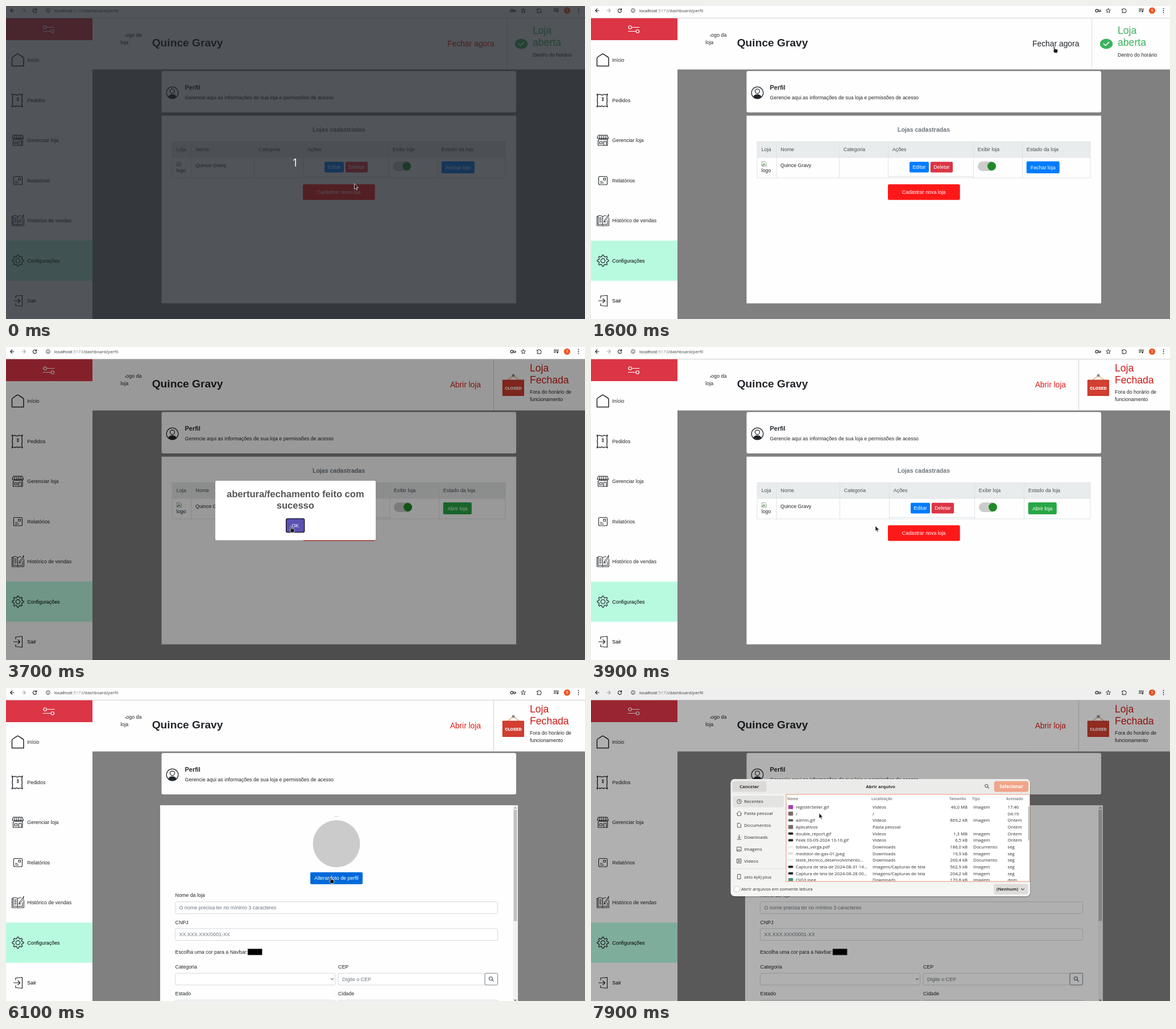
An HTML page for the animation above (8000 ms loop, 1018 by 550 pixels).

```html
<!DOCTYPE html>
<html lang="pt-BR">
<head>
<meta charset="utf-8">
<title>Painel da loja</title>
<style>
html, body { margin: 0; width: 100%; height: 100%; overflow: hidden; background: #808080; }
svg { display: block; width: 1018px; height: 550px; }
text { font-family: "Liberation Sans", Arial, sans-serif; white-space: pre; }
.ui { font-family: "Open Sans", "Noto Sans", sans-serif; }
</style>
</head>
<body>
<svg id="stage" viewBox="0 0 1018 550" xmlns="http://www.w3.org/2000/svg"></svg>
<script>
const LOOP = 8000, STEP = 100;
const INK = '#212529', WHITE = '#fefefe', BLUE = '#007bff', RED = '#dc3545', GREEN = '#28a745', LINE = '#dee2e6', MUTED = '#6c757d';

const rect = (x, y, w, h, fill, r = 0, extra = '') =>
  `<rect x="${x}" y="${y}" width="${w}" height="${h}" rx="${r}" fill="${fill}" ${extra}/>`;
const circle = (x, y, r, fill, extra = '') => `<circle cx="${x}" cy="${y}" r="${r}" fill="${fill}" ${extra}/>`;
const path = (d, color = INK, w = 1.1, fill = 'none') =>
  `<path d="${d}" stroke="${color}" stroke-width="${w}" fill="${fill}" stroke-linecap="round" stroke-linejoin="round"/>`;
const text = (x, y, s, size = 8.9, fill = INK, extra = '') =>
  `<text x="${x}" y="${y}" font-size="${size}" fill="${fill}" ${extra}>${s}</text>`;
const mid = 'text-anchor="middle"', end = 'text-anchor="end"', bold = 'font-weight="700"', ui = 'class="ui"';
const group = (id, body, extra = '') => `<g id="${id}" ${extra}>${body}</g>`;
const button = (x, y, w, h, fill, label, base) =>
  rect(x, y, w, h, fill, 2) + text(x + w / 2, base, label, 8.9, '#fff', mid);

function toolbar() {
  return rect(0, 0, 1018, 21, WHITE) + rect(0, 20.8, 1018, .8, '#d5d5d5') +
    path('M14 8H8M10.8 5L7.8 8L10.8 11') + path('M28 8H34M31.2 5L34.2 8L31.2 11', '#aaa') +
    path('M53.3 6.4A3.2 3.2 0 1 0 53.7 9M53.8 4.6V6.9H51.5') +
    circle(74, 8, 3.3, 'none', 'stroke="#444"') + path('M74 7.8V9.8M74 6.2V6.3', '#444', .9) +
    text(85, 11, 'localhost<tspan fill="#80868b">:5173</tspan><tspan fill="#3c4043">/dashboard/perfil</tspan>', 7.5, INK, ui) +
    circle(889.3, 8.2, 2.3, 'none', `stroke="${INK}" stroke-width="1.2"`) + path('M891.7 7.2H896.2V9.4H891.7M894.5 9.4V10.5', INK, 1) +
    path('M909.5 4.2L910.6 6.8L913.4 7L911.3 8.9L912 11.7L909.5 10.2L907 11.7L907.7 8.9L905.6 7L908.4 6.8Z', INK, .9) +
    path('M934 5.5H936A1.2 1.2 0 0 1 938.4 5.5H940.2V7.2A1.2 1.2 0 0 1 940.2 9.8V11.7H934V9.8A1.2 1.2 0 0 0 934 7.2Z', INK, 1) +
    path('M963.5 5H969M963.5 7.2H969M963.5 9.4H966.5M970.5 9.5V5H971.5', INK, 1) + circle(969.5, 9.7, 1.3, INK) +
    circle(986.5, 8, 5.6, '#f0501e') + text(986.5, 10.3, 'S', 6.3, '#fff', mid) +
    [4.5, 8, 11.5].map(y => circle(1006.5, y, .9, INK)).join('');
}

function gear(cx, cy) {
  const pts = [];
  for (let i = 0; i < 32; i++) {
    const a = (i - .5) * Math.PI / 16, r = i % 4 < 2 ? 10 : 7.3;
    pts.push((cx + r * Math.sin(a)).toFixed(1) + ' ' + (cy - r * Math.cos(a)).toFixed(1));
  }
  return path('M' + pts.join('L') + 'Z', INK, 1.2) + circle(cx, cy, 3.7, 'none', `stroke="${INK}" stroke-width="1.2"`);
}

function sidebar() {
  const labels = ['Início', 'Pedidos', 'Gerenciar loja', 'Relatórios', 'Histórico de vendas', 'Configurações', 'Sair'];
  return rect(0, 21.5, 152, 528.5, WHITE) + rect(0, 21.5, 152, 38.5, RED) + rect(0, 412.3, 152, 70.5, '#b8fae0') +
    path('M65.5 37.5H66M71.5 37.5H85M65.5 44.5H79M84.5 44.5H85', '#fff', 1.2) +
    circle(68.7, 37.5, 2.7, 'none', 'stroke="#fff" stroke-width="1.1"') + circle(81.8, 44.5, 2.7, 'none', 'stroke="#fff" stroke-width="1.1"') +
    labels.map((s, i) => text(37.3, 98 + i * 70.5, s, 8.9, i > 4 ? '#000' : INK)).join('') +
    path('M10.5 92.5Q10.5 90.5 12 89.5L19 84.8Q20.7 83.8 22.3 84.8L29.5 89.5Q31 90.5 31 92.5V105.5H10.5Z', INK, 1.5) +
    path('M10.5 154.5Q13 157 15.5 155Q19.5 158 23.5 155Q26 157 29 154.5Q27 160 28.5 166Q27 172 29 177.5Q25 174.5 22 177Q19 174 16 177Q13.5 174.5 10.5 177.5Q12.5 172 11 166Q12.5 160 10.5 154.5Z', INK, 1.3) +
    path('M19.5 161.5H22M20 163.7H22M19.5 166H22', INK, 1.3) +
    path('M13 227H28.5L30.5 232.5H11ZM12.5 235V245H29V235M12.5 235Q14 236 15.5 233Q17.5 237 19 233Q20.8 237 22.5 233Q24.3 237 26 233Q28 237 30 233M15.7 227L15 233M19 227V233M22.5 227V233M26 227L26.5 233M15 238.5H20V242H15ZM22.5 245V238H27V245', INK, 1.1) +
    rect(13.5, 299.5, 15, 14.5, 'none', 2, `stroke="${INK}" stroke-width="1.1"`) + rect(22, 302.5, 3.5, 3.5, 'none', 0, `stroke="${INK}"`) +
    path('M16.5 308.3H20M16.5 311H22', INK, 1) +
    path('M10.5 370H12.5V368.5Q17 367 20.5 370Q23 368 26 368.5M31.5 373V386H22.5Q21 387.5 19.5 386H10.5V370M20.5 370V384.5Q16 382 12.5 384V370M20.5 384.5Q25 382 29 384V377M14.5 372H18.5M14.5 374.5H18.5M14.5 377H18.5M14.5 379.5H18.5M22.5 379.5H26M31 366.5L24 376L23 378.5L25.5 377Q31.5 372 31 366.5Z', INK, 1) +
    gear(21, 447.5) +
    path('M17 513V509.5L28.5 508.5V527.5L17 526.5V523M13.5 518H24.5M21 514.5L24.6 518L21 521.5', INK, 1.2);
}

function page() {
  return rect(152, 21.5, 866, 90, WHITE) +
    text(209.3, 54, 'logo da') + rect(207, 45, 4.6, 6, WHITE) + text(201.3, 67, 'loja') +
    text(256.7, 71, 'Quince Gravy', 19.2, INK, bold) +
    rect(273.5, 114.3, 623.5, 72.7, WHITE, 3) +
    circle(292.5, 152.5, 10.3, 'none', `stroke="${INK}" stroke-width="1.2"`) + circle(292.5, 149.8, 4, 'none', `stroke="${INK}" stroke-width="1.2"`) +
    path('M285.5 159.5Q287 155.5 292.5 155.5Q298 155.5 299.5 159.5Q293 165 285.5 159.5Z', INK, .6, INK) +
    text(314.6, 147, 'Perfil', 10.9, INK, bold) +
    text(314.6, 163.5, 'Gerencie aqui as informações de sua loja e permissões de acesso') +
    rect(273.5, 192.7, 623.5, 329.8, WHITE) +
    text(585, 221.3, 'Lojas cadastradas', 10.55, MUTED, bold + ' ' + mid) +
    rect(292.5, 238.5, 585.5, 27.5, '#e9ecec');
}

function table(cols, label, color, width) {
  const heads = ['Loja', 'Nome', 'Categoria', 'Ações', 'Exibir loja', 'Estado da loja'];
  const [, , actions, toggle, state] = cols;
  return heads.map((s, i) => text((i ? cols[i - 1] : 292.5) + 7.3, 255, s, 8.9, '#495057')).join('') +
    path('M' + cols.map(x => `${x} 238.5V302`).join('M'), LINE, 1) +
    path(`M292.5 238.5H878V302H292.5ZM292.5 266H878M${actions + 1} 299.5H${toggle}`, LINE, 1) +
    path('M300.5 273.5H306L308.5 276V281.5H300.5Z', '#999', .8, '#eef3ee') + path('M301.5 280.5L304 277.5L306 279', '#4a9a4a', 1.2) +
    text(299.7, 291.6, 'logo') + text(333, 282.7, 'Quince Gravy') +
    button(actions + 37.5, 273.8, 34, 18.7, BLUE, 'Editar', 286) +
    button(actions + 74.3, 273.8, 39.3, 18.7, RED, 'Deletar', 286) +
    rect(toggle + 7.5, 273.2, 32, 16.8, '#ccc', 8.4) + circle(toggle + 32, 281.5, 7.5, '#1f8a26') +
    button(state + 7.2, 273, width, 21, color, label, 286.5);
}

const openState = () =>
  path('M880.5 22V111', '#dcdcdc', 1) +
  `<text id="closeNow" x="776" y="71" font-size="13.85">Fechar agora</text>` +
  `<ellipse cx="906" cy="66.5" rx="11.2" ry="9" fill="#3bb35f"/>` + path('M901.5 66.5L904.7 69.5L910.5 63.7', '#fff', 1.7) +
  text(926, 49.2, 'Loja', 17.65, '#3bb35f') + text(926, 70.2, 'aberta', 17.65, '#3bb35f') + text(926, 88.5, 'Dentro do horário') +
  table([326, 436.5, 522.5, 672.5, 758.5], 'Fechar loja', BLUE, 58);

const closedState = () =>
  path('M857.5 22V111', '#d2d2d2', 1) + text(780.7, 71, 'Abrir loja', 13.75, '#dd1c1a') +
  path('M882 58L892 50L902 58', '#e2a869', 1.4) + circle(892, 50, 2.6, '#8a8f8c') +
  rect(872.7, 57.5, 38.3, 28.5, '#d23f31', 1) + rect(874.5, 59.3, 34.7, 24.9, 'none', 0, 'stroke="#b93a2e" stroke-width=".8"') +
  text(892, 75, 'CLOSED', 8, '#fff', mid + ' style="font-family:Roboto,sans-serif;font-weight:900"') +
  text(921, 42.5, 'Loja', 17.65, '#cf1b17') + text(921, 63.6, 'Fechada', 17.65, '#cf1b17') +
  text(921, 82, 'Fora do horário de') + text(921, 95.3, 'funcionamento') +
  table([326, 437.5, 524.5, 674.5, 761.5], 'Abrir loja', GREEN, 50);

function form() {
  const field = (x, y, w, hint = '') =>
    rect(x, y, w, 20.7, '#fff', 2, 'stroke="#ced4da" stroke-width=".9"') + text(x + 7, y + 13.5, hint, 8.9, MUTED);
  return rect(271, 192, 629, 358, '#808080') + rect(271, 206, 629, 344, WHITE) +
    rect(891.5, 206, 8, 344, '#f1f1f1') + rect(892.5, 214, 6, 195.5, '#c1c1c1') +
    path('M893.8 211.3L895.5 209.3L897.2 211.3Z', '#777', .3, '#777') + path('M893.8 548L895.5 550L897.2 548Z', '#555', .3, '#555') +
    group('photo', rect(577, 225, 8, .8, '#ccc') + circle(581, 273.7, 41.4, '#cbcbcb')) +
    `<rect id="photoButton" x="535" y="323.7" width="92" height="21" rx="2"/>` + text(581, 337.3, 'Alterar foto de perfil', 8.9, '#fff', mid) +
    text(297.5, 367.3, 'Nome da loja') + field(297.5, 375.7, 567, 'O nome precisa ter no mínimo 3 caracteres') +
    text(297.5, 414.6, 'CNPJ') + field(297.5, 422.8, 567, 'XX.XXX.XXX/0001-XX') +
    text(297.5, 466.5, 'Escolha uma cor para a Navbar:') + rect(425, 458.2, 25.3, 11, '#000', 0, 'stroke="#999" stroke-width=".7"') +
    text(297.5, 493, 'Categoria') + field(297.5, 501.2, 281) + path('M571.5 510.5L573.5 512.7L575.5 510.5', INK, 1) +
    text(584, 493, 'CEP') + field(584, 501.2, 258, 'Digite o CEP') +
    rect(842, 501.2, 22.5, 20.7, WHITE, 2, `stroke="${MUTED}" stroke-width=".9"`) +
    group('searchIcon', circle(852.3, 510.5, 2.9, 'none', `stroke="${MUTED}" stroke-width="1.4"`) + path('M854.5 512.8L857 515.3', MUTED, 1.6)) +
    text(297.5, 540.4, 'Estado') + field(297.5, 548.5, 281) + text(584, 540.4, 'Cidade') + field(584, 548.5, 281);
}

const popup = () =>
  rect(368, 235, 282, 104.5, '#fff', 2.7) +
  text(508.8, 263.8, 'abertura/fechamento feito com', 16.55, '#545454', bold + ' ' + mid) +
  text(508.8, 283.6, 'sucesso', 16.55, '#545454', bold + ' ' + mid) +
  `<rect id="ok" x="492.6" y="301.6" width="32" height="24" rx="2.5" stroke="#15151f" stroke-width="1.4"/>` +
  text(508.6, 316.7, 'OK', 8.8, '#fff', mid);

function fileDialog() {
  const rows = [
    ['registerSeller.gif', 'Vídeos', '46,0 MB', 'Imagem', '17:46', '#a83fb0'],
    ['/', '/', '', '', '04:19', '#7c6a6a'],
    ['admin.gif', 'Vídeos', '869,2 kB', 'Imagem', 'Ontem', '#555'],
    ['Aplicativos', 'Pasta pessoal', '', '', 'Ontem', '#7c6a6a'],
    ['double_report.gif', 'Vídeos', '1,3 MB', 'Imagem', 'Ontem', '#222'],
    ['Peek 03-09-2024 13-16.gif', 'Vídeos', '6,5 kB', 'Imagem', 'Ontem', '#222'],
    ['tobias_verga.pdf', 'Downloads', '186,0 kB', 'Documento', 'seg', '#eee'],
    ['medidor-de-gas-01.jpeg', 'Downloads', '19,9 kB', 'Imagem', 'seg', '#ddd'],
    ['teste_técnico_desenvolvimento…', 'Downloads', '260,4 kB', 'Documento', 'seg', '#eee'],
    ['Captura de tela de 2024-08-31 14…', 'Imagens/Capturas de tela', '562,9 kB', 'Imagem', 'seg', '#222'],
    ['Captura de tela de 2024-08-28 00…', 'Imagens/Capturas de tela', '204,2 kB', 'Imagem', 'seg', '#222'],
    ['OIG3.jpeg', 'Downloads', '170,8 kB', 'Imagem', 'dom', '#4a8f7a']];
  const label = (x, y, s, size = 7.75, fill = '#2e2e2e', extra = '') => text(x, y, s, size, fill, ui + ' ' + extra);
  const list = rows.map(([name, place, size, kind, date, color], i) => {
    const y = 212 + i * 11.66, tall = i < 2 || i === 3 || i > 10 ? 7 : 4;
    return rect(347, y - 2.8 - tall / 2, 8.3, tall, color, 1) + label(360, y, name) + label(495, y, place) +
      label(662, y, size, 7.75, '#2e2e2e', end) + label(672, y, kind) + label(732.5, y, date);
  }).join('');
  const heads = [[345, 'Nome'], [493, 'Localização'], [630, 'Tamanho'], [670, 'Tipo'], [730, 'Acessado']];
  const places = ['Recentes', 'Pasta pessoal', 'Documentos', 'Downloads', 'Imagens', 'Vídeos'];
  const g = '#4a4a4a';
  return rect(244.5, 160, 528.5, 208, '#000', 8, 'opacity=".18"') + rect(245.5, 160, 526.5, 206, '#f5f5f4', 7) +
    path('M246 186V167Q246 160.5 253 160.5H764.5Q771.5 160.5 771.5 167V186Z', '#ebebea', .5, '#ebebea') +
    rect(248.5, 164, 60, 18.3, '#dad9d8', 4) + label(278.3, 175.8, 'Cancelar', 7.8, '#2e2e2e', bold + ' ' + mid) +
    label(509, 175.8, 'Abrir arquivo', 7.8, '#2e2e2e', bold + ' ' + mid) +
    circle(695.3, 172, 2.7, 'none', `stroke="${g}"`) + path('M697.4 174.2L699.3 176', g, 1.1) +
    rect(708.8, 163.8, 60.2, 18.6, '#f1a489', 4) + label(739, 175.8, 'Selecionar', 8, '#fff', bold + ' ' + mid) +
    rect(246, 186, 97, 154, '#f3f3f2') + rect(249, 189, 90, 20.5, '#e3e3e2', 4) +
    places.map((s, i) => label(269.3, 202 + i * 20.95, s, 7.95)).join('') +
    circle(260.5, 199.5, 3.8, 'none', `stroke="${g}" stroke-width=".9"`) + path('M260.5 197V199.7H262.5', g, .8) +
    path('M256.3 220.5L260.5 216.5L264.7 220.5M257.5 220V224.3H263.5V220', g, .9) +
    path('M258 237.5H261.5L263.5 239.5V245H258Z', g, .9) +
    path('M260.5 258V264M258 261.7L260.5 264.2L263 261.7M257 266H264', g, .9) +
    path('M257 279.5H264V286.5H257ZM257.5 286L260 283L262 285', g, .9) +
    path('M257 300.5H264V307.5H257ZM259.5 302.3L262.3 304L259.5 305.7Z', g, .9) +
    rect(246, 317, 97, .8, '#dcdcdb') + path('M258 327.5H263V335.5H258Z', g, .9) + label(269.3, 334.6, 'zelo k(4) plus', 7.95) +
    rect(343, 187, 428.3, 153, '#fff') + heads.map(([x, s]) => label(x, 196.8, s, 6.4, '#8b8b8b', bold)).join('') +
    `<clipPath id="listClip"><rect x="343" y="203" width="428" height="136.5"/></clipPath><g clip-path="url(#listClip)">${list}</g>` +
    rect(343, 187, 428.3, 153, 'none', 0, 'stroke="#efa184" stroke-width="1.2"') + rect(768.7, 208, 1.8, 60, '#b5b5b5', 1) +
    rect(251.5, 348.5, 9.5, 9.5, '#fff', 2, 'stroke="#c4c4c3" stroke-width=".9"') +
    label(264, 356.2, 'Abrir arquivos em somente leitura', 7.9) +
    rect(708, 344.2, 60.3, 18.6, '#dedddc', 4) + label(732, 356.2, '(Nenhum)', 7.6, '#2e2e2e', bold + ' ' + mid) +
    path('M756.5 352.3L759 354.8L761.5 352.3', g, 1.1);
}

const cursor = () => group('cursor',
  group('arrow', path('M0 0V9.2L2.2 7.3L3.7 10.7L5.3 10L3.8 6.7H6.7Z', '#fff', .7, '#1c1c1c')) +
  group('hand', path('M-.4 1.2Q.7 -.6 1.6 1L2 4.2L6.5 5.2Q7.6 5.6 7.3 7L6.5 11.5H1.6L-1.3 7.8Q-1.3 6.3 .3 7Z', '#fff', .7, '#1c1c1c')));

const stage = document.getElementById('stage');
stage.innerHTML =
  rect(0, 0, 1018, 550, '#808080') + toolbar() + sidebar() + page() +
  group('opened', openState()) + group('closed', closedState()) +
  `<rect id="register" x="522" y="313.3" width="126.7" height="27.5" rx="2.5"/>` + text(585.2, 329.8, 'Cadastrar nova loja', 8.85, '#fff', mid) +
  group('form', form()) +
  rect(0, 21.5, 1018, 528.5, '#000', 0, 'id="dim"') + rect(0, 0, 1018, 21.5, '#000', 0, 'id="barDim"') +
  group('popup', popup()) + group('dialog', fileDialog()) +
  group('countdown', rect(0, 0, 1018, 550, '#1d2128', 0, 'opacity=".77"') + text(508.5, 281.8, '1', 19.5, '#fff', ui + ' ' + mid)) +
  cursor();

const $ = id => document.getElementById(id);
const show = (id, on) => $(id).setAttribute('display', on ? 'inline' : 'none');
const set = (id, name, value) => $(id).setAttribute(name, value);
const within = (t, spans) => spans.some(([a, b]) => t >= a && t < b);

// Linear interpolation through [time, value] pairs.
function track(t, keys) {
  const i = keys.findIndex(k => k[0] > t);
  if (i === 0) return keys[0][1];
  if (i < 0) return keys[keys.length - 1][1];
  const [t0, a] = keys[i - 1], [t1, b] = keys[i];
  return a + (b - a) * (t - t0) / (t1 - t0);
}

function scaleAbout(id, s, x, y) {
  set(id, 'transform', `translate(${x} ${y}) scale(${s}) translate(${-x} ${-y})`);
}

const moves = [
  [0, 612.5, 312.5], [300, 612.5, 312.5], [600, 618, 230], [900, 633, 87], [1200, 740, 75], [1500, 808, 71], [1600, 813.5, 71],
  [2300, 813.5, 71], [2600, 650, 210], [2900, 516, 314], [3200, 516, 314], [3400, 500, 314.5],
  [3900, 500, 314.5], [4400, 599, 315], [4500, 599, 315], [4700, 606, 328.5],
  [5500, 606, 328.5], [6100, 569.5, 332], [6500, 569.5, 332], [7100, 345.5, 191.5],
  [7200, 345.5, 191.5], [7500, 395.5, 211.5], [7700, 395.5, 211.5], [7900, 401, 220]];
const pathX = moves.map(([t, x]) => [t, x]), pathY = moves.map(([t, , y]) => [t, y]);

function draw(t) {
  set('countdown', 'opacity', track(t, [[0, 1], [300, 0]]));
  show('opened', t < 2200);
  show('closed', t >= 2200);
  set('closeNow', 'fill', within(t, [[1400, 2200]]) ? INK : '#e01f16');
  set('register', 'fill', within(t, [[5100, 5300]]) ? '#e81414' : '#ff1818');

  show('form', t >= 5300);
  show('photo', t >= 5400);
  show('searchIcon', t >= 5600);
  set('photoButton', 'fill', t >= 5900 ? '#0069d9' : BLUE);

  set('dim', 'opacity', t < 2200 ? 0 : track(t, [[2200, .31], [2300, .4], [3700, .4], [3900, 0], [6300, 0], [6600, .31]]));
  set('barDim', 'opacity', track(t, [[6300, 0], [6600, .06]]));

  show('popup', within(t, [[2200, 3900]]));
  set('popup', 'opacity', track(t, [[3700, 1], [3850, 0]]));
  scaleAbout('popup', track(t, [[2200, .84], [2300, 1.03], [2400, .96], [2500, 1], [3700, 1], [3850, .5]]), 508.8, 287.2);
  set('ok', 'fill', t < 2800 ? '#6d64d8' : t < 3600 ? '#655cca' : '#5a52b3');

  show('dialog', t >= 6400);
  set('dialog', 'opacity', track(t, [[6300, 0], [6600, 1]]));
  scaleAbout('dialog', track(t, [[6300, .9], [6600, 1]]), 508.8, 263);

  const hand = within(t, [[1400, 2200], [2800, 3800], [4300, 5300], [5900, 6500]]);
  show('hand', hand);
  show('arrow', !hand);
  set('cursor', 'transform', `translate(${track(t, pathX)} ${track(t, pathY)})`);
}

const start = performance.now();
function tick() {
  const t = (performance.now() - start) % LOOP;
  draw(Math.floor(t / STEP) * STEP);
  requestAnimationFrame(tick);
}
draw(0);
requestAnimationFrame(tick);
</script>
</body>
</html>
```
